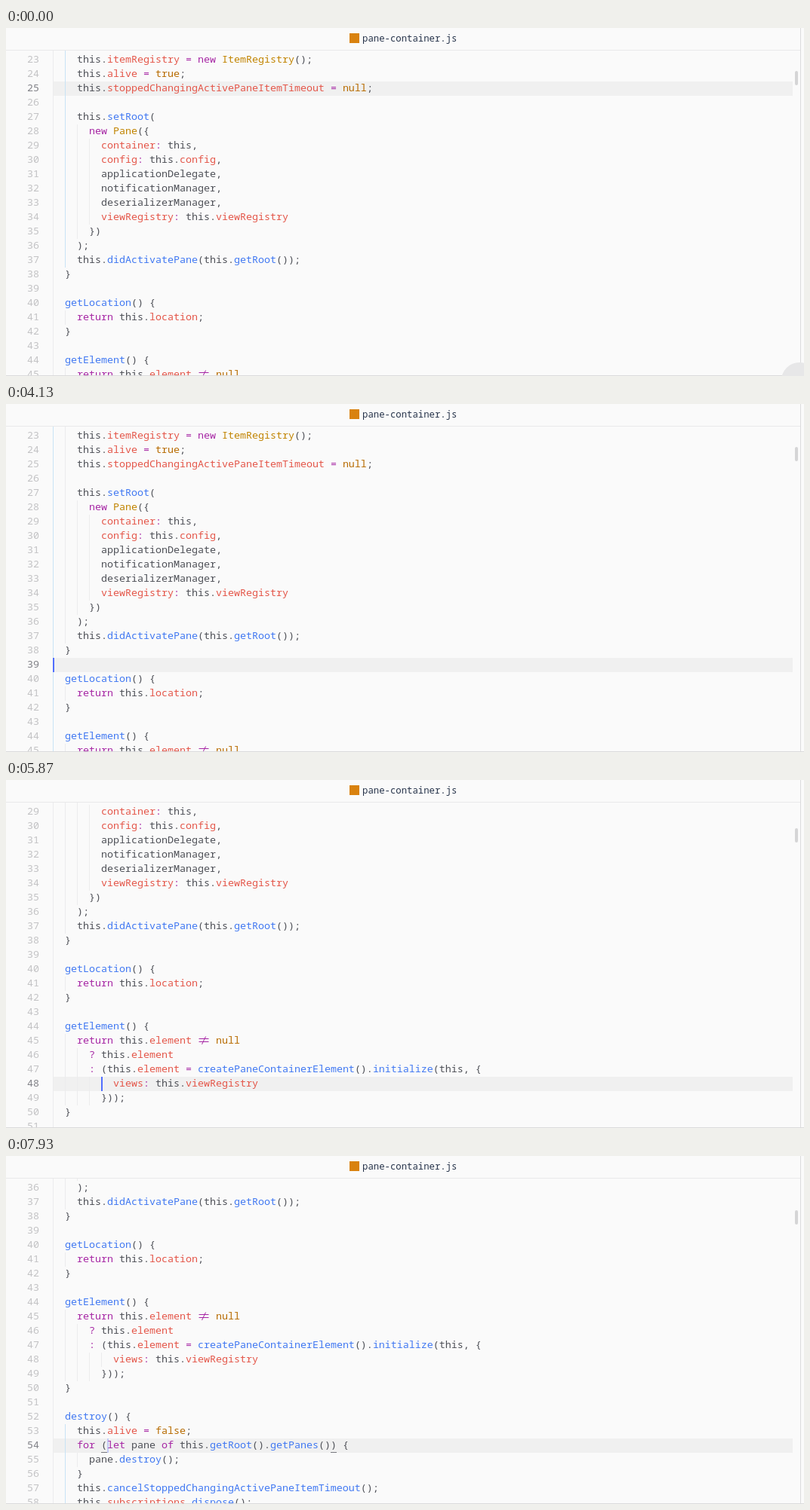
Animation of 1057 by 462 pixels, one loop 8000 ms. Source, as an HTML page:

```html
<!DOCTYPE html>
<html lang="en">
<head>
<meta charset="utf-8">
<title>pane-container.js</title>
<style>
html, body { margin: 0; width: 100%; height: 100%; overflow: hidden; background: #fafafa; }
body { position: relative; font: 13.333px/19px "Noto Sans Mono", "DejaVu Sans Mono", monospace; color: #4e5057; }
div, b { position: absolute; }
i { font-style: normal; }
#icon { left: 455px; top: 7px; width: 13px; height: 13px; background: #d9820f; }
#title { left: 472px; top: 4px; font-size: 12.3px; color: #26334a; white-space: pre; }
#view { left: 0; top: 30px; width: 1052px; height: 431px; overflow: hidden; }
#doc { left: 0; top: 0; width: 1052px; }
.line { left: 62px; height: 19px; margin-top: -1px; white-space: pre; }
.num { left: -34px; top: 0; color: #c3c3c5; }
.num.on { color: #808187; }
.line b { top: 1px; width: 1px; height: 19px; background: #ececed; }
.line b.on { background: #c8e3f5; }
#row { left: 62px; width: 980px; height: 19px; background: #f0f0f0; }
#caret { width: 2px; height: 19px; background: #526fff; }
.mark { width: 8px; height: 1px; background: #77787e; }
#thumb { left: 1045px; width: 4px; height: 19px; border-radius: 2px; background: #d5d5d6; }
.rule { background: #dbdbdc; }
#disc { left: 1027px; top: 444px; width: 48px; height: 48px; border-radius: 50%; background: #e7e7e8; }
.k { color: #a626a4; } .n { color: #b76b01; } .c { color: #c18401; }
.f { color: #4078f2; } .p { color: #e45649; }
svg { width: 16px; height: 19px; vertical-align: top; fill: none; stroke: #a626a4; }
</style>
</head>
<body>
<div id="icon"></div>
<div id="title">pane-container.js</div>
<div id="view"><div id="doc"><div id="row"></div></div></div>
<div id="thumb"></div>
<div class="rule" style="left:0;top:29px;width:1052px;height:1px;background:#e9e9ea"></div>
<div class="rule" style="left:1052px;top:0;width:1px;height:462px"></div>
<div class="rule" style="left:0;top:461px;width:1057px;height:1px"></div>
<div id="disc"></div>
<script>
const FIRST = 22, START = 25, GOAL = 9, ROW = 19, COL = 8, LOOP = 8000;
const code = `
    this.itemRegistry = new ItemRegistry();
    this.alive = true;
    this.stoppedChangingActivePaneItemTimeout = null;

    this.setRoot(
      new Pane({
        container: this,
        config: this.config,
        applicationDelegate,
        notificationManager,
        deserializerManager,
        viewRegistry: this.viewRegistry
      })
    );
    this.didActivatePane(this.getRoot());
  }

  getLocation() {
    return this.location;
  }

  getElement() {
    return this.element != null
      ? this.element
      : (this.element = createPaneContainerElement().initialize(this, {
          views: this.viewRegistry
        }));
  }

  destroy() {
    this.alive = false;
    for (let pane of this.getRoot().getPanes()) {
      pane.destroy();
    }
    this.cancelStoppedChangingActivePaneItemTimeout();
    this.subscriptions.dispose();`.split("\n");

// One key press per entry: down each time, the last one up.
const moves = [1730, 1870, 1930, 2130, 2270, 2400, 2600, 2730, 3200, 3400, 3600, 3730, 3930,
  4130, 4330, 4530, 4730, 4930, 5130, 5270, 5470, 5670, 5870, 6130, 6330, 6470, 6730, 6930,
  7070, 7270, 7930];

const $ = id => document.getElementById(id);
const doc = $("doc");
const add = (parent, tag, cls, html = "") => {
  const el = document.createElement(tag);
  el.className = cls;
  el.innerHTML = html;
  return parent.appendChild(el);
};
const place = (el, line, col, dy = 0) => {
  el.style.left = 62 + col * COL + "px";
  el.style.top = (line - FIRST) * ROW + dy + "px";
};

const notEqual = '<svg><path d="M1.5 7.5h13M1.5 11.5h13M5.5 15L10.5 4.5"/></svg>';
const syntax = /(\b(?:new|return|for|let|of)\b|!=|[=?:])|(\b(?:true|false|null)\b)|(\b[A-Z]\w*)|(\b\w+(?=\())|(\b\w+(?=:)|(?<=\.)\w+)/g;
const paint = text => text.replace(syntax, (m, ...groups) =>
  m === "!=" ? notEqual : `<i class="${"kncfp"[groups.findIndex(Boolean)]}">${m}</i>`);

let indent = 4;
const lines = code.map((text, i) => {
  if (text) indent = text.search(/\S/);
  const el = add(doc, "div", "line", paint(text));
  place(el, FIRST + i, 0);
  const num = add(el, "div", "num", FIRST + i);
  const guides = [];
  for (let col = 0; col < indent; col += 2) {
    const guide = add(el, "b", "");
    guide.style.left = col * COL + "px";
    guides.push(guide);
  }
  return { text, num, guides };
});

// Matching brackets, keyed "row,col"
const pairs = {}, open = [];
code.forEach((text, r) => [...text].forEach((ch, c) => {
  if ("({".includes(ch)) open.push([r, c]);
  else if (")}".includes(ch) && open.length) {
    const from = open.pop();
    pairs[from] = [r, c];
    pairs[[r, c]] = from;
  }
}));

const marks = [add(doc, "div", "mark"), add(doc, "div", "mark")];
const caret = add(doc, "div", "");
caret.id = "caret";

function caretCol(text) {
  const col = Math.min(GOAL, text.length);
  return col < text.search(/\S/) ? col - col % 2 : col;
}

let shown = -1;
function show(count) {
  if (count === shown) return;
  shown = count;
  const lowest = Math.min(START + count, 55);
  const line = count === moves.length ? 54 : lowest;
  const top = Math.max(23, lowest - 19);
  const at = line - FIRST, { text, guides } = lines[at];

  doc.style.top = 3 - (top - FIRST) * ROW + "px";
  $("thumb").style.top = 57 + (top - 23) * 1.15 + "px";
  $("row").style.top = at * ROW + "px";
  const col = caretCol(text);
  place(caret, line, col);

  const depth = guides.length - 1;
  let from = at, to = at;
  while (lines[from - 1]?.guides[depth]) from--;
  while (lines[to + 1]?.guides[depth]) to++;
  lines.forEach((l, i) => {
    l.num.classList.toggle("on", i === at);
    l.guides.forEach((g, d) => g.classList.toggle("on", d === depth && i >= from && i <= to));
  });

  const here = [at, col - 1], match = pairs[here];
  [here, match].forEach((p, i) => {
    marks[i].hidden = !match;
    if (match) place(marks[i], FIRST + p[0], p[1], ROW - 1);
  });
}

const clamp = v => Math.max(0, Math.min(1, v));
const fade = idle => clamp(1 - (idle - 300) / 500);

function caretAlpha(t, count) {
  if (!count) return clamp(1 - Math.abs(t - 1300) / 450);
  const last = moves[count - 1], idle = Math.max(0, t - last);
  const before = count > 1 ? fade(last - moves[count - 2]) : 0.1;
  return Math.min(fade(idle), before + idle / 120);
}

const begin = performance.now();
function frame() {
  const t = (performance.now() - begin) % LOOP;
  const count = moves.filter(m => m <= t + 5).length;
  show(count);
  caret.style.opacity = caretAlpha(t, count);
  $("disc").style.opacity = clamp((530 - t) / 460);
  requestAnimationFrame(frame);
}
frame();
</script>
</body>
</html>
```
